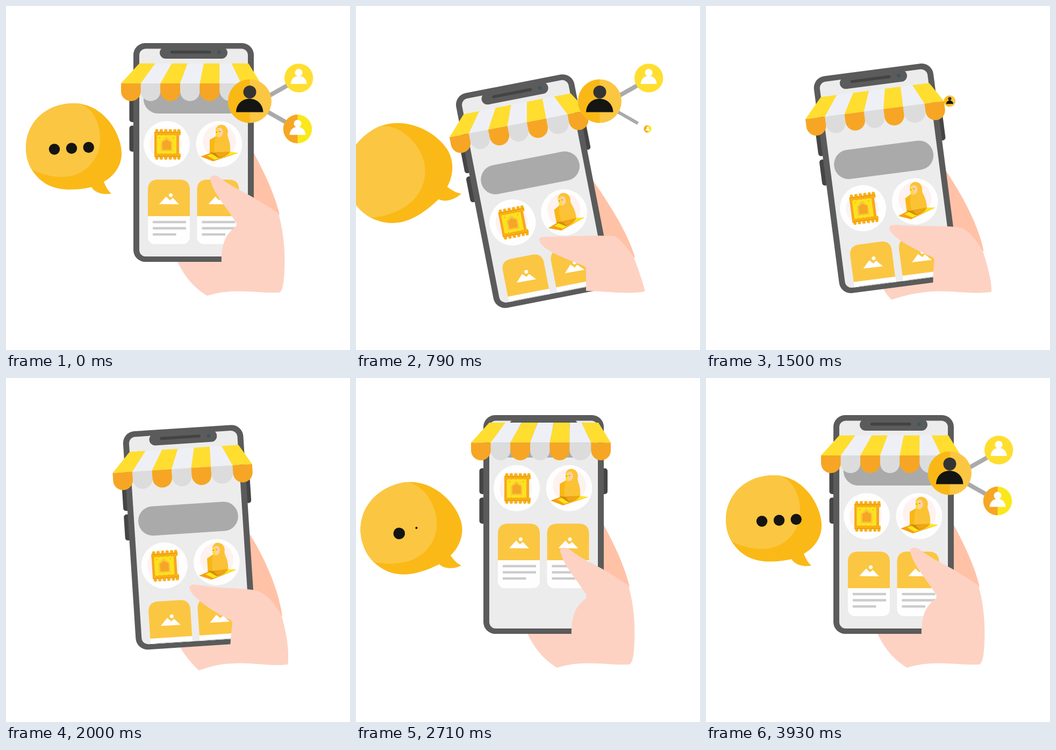
These frames come from a looping animation (640 by 640 pixels, 4780 ms). An HTML page:

```html
<!DOCTYPE html>
<html lang="en">
<head>
<meta charset="utf-8">
<title>Mobile shop</title>
<style>
  html, body { margin: 0; width: 100%; height: 100%; overflow: hidden; background: #fff; }
  svg { display: block; width: 100vw; height: 100vh; }
</style>
</head>
<body>
<svg viewBox="0 0 640 640">
  <defs>
    <clipPath id="screen"><rect x="248" y="79.5" width="202" height="386.5" rx="12"/></clipPath>
    <g id="card">
      <rect x="264" y="350" width="78" height="93" rx="13" fill="#fefefe"/>
      <path d="M264 391V342Q264 323 283 323H323Q342 323 342 342V391Z" fill="#fbc642"/>
      <path d="M285 368.500L298 354.500 305 361.500 310.500 357 322 369Z" fill="#fff"/>
      <circle cx="306.500" cy="352" r="3.500" fill="#fff"/>
      <path d="M273 402H335M273 413.500H335M273 425H316.500" stroke="#ccc" stroke-width="4.400"/>
    </g>
    <g id="person"><circle cy="-10" r="7"/><path d="M-15 11C-14 -9 14 -9 15 11Z"/></g>
    <g id="fringe" fill="#f8a81d">
      <rect x="276" y="234" width="49" height="6"/>
      <path d="M280.500 232V238M288.900 232V238M297.300 232V238M305.700 232V238M314.100 232V238M321.500 232V238"
            stroke="#f9b115" stroke-width="6" stroke-linecap="round"/>
      <path d="M277 235H324" stroke="#e5900f" stroke-width="1"/>
    </g>
  </defs>

  <path id="fingers" fill="#ffc2a7"/>
  <path id="wrist" fill="#fdd2c3"/>

  <g id="phone">
    <g fill="#454545">
      <rect x="229.500" y="168" width="16" height="48" rx="5"/>
      <rect x="229.500" y="222.500" width="16" height="48.500" rx="5"/>
      <rect x="452" y="168" width="16" height="48" rx="5"/>
    </g>
    <rect x="237" y="69" width="224" height="407" rx="22" fill="#5a5b5a"/>
    <rect x="248" y="79.500" width="202" height="386.500" rx="12" fill="#ececec"/>
    <rect x="286" y="76" width="126" height="22" rx="11" fill="#5a5b5a"/>
    <rect x="306" y="83" width="75.500" height="5.500" rx="2.700" fill="#434343"/>
    <circle cx="396.500" cy="86" r="3" fill="#3b5466"/>
    <g clip-path="url(#screen)">
      <g id="content">
        <rect x="255.800" y="145.500" width="186" height="54.500" rx="27" fill="#aaa"/>
        <g fill="#fefefe"><circle cx="299" cy="257" r="43"/><circle cx="396.500" cy="257" r="43"/></g>
        <g fill="#fef2f1"><circle cx="297" cy="257" r="30"/><circle cx="397" cy="252" r="31"/></g>
        <g>
          <rect x="276" y="236" width="46" height="44" fill="#f6a623"/>
          <rect x="280.500" y="239.500" width="36.500" height="36" fill="#fbe31c"/>
          <path d="M288 270V253L298.500 243 309.500 253V270Z" fill="#fbc540"/>
          <path d="M291 267.500V253Q295 252 298.500 248 302 252 307 253V267.500Z" fill="#f5a623"/>
          <path d="M285 245h2m23 0h2" stroke="#f5a623" stroke-width="2"/>
          <use href="#fringe"/><use href="#fringe" transform="matrix(1 0 0 -1 0 515)"/>
        </g>
        <g>
          <path d="M362 280L392 269 432 273.500 385 289Z" fill="#f6a014"/>
          <path d="M374 278L402 269 432 273.500 388 286Z" fill="#ffe515"/>
          <path d="M378 272Q393 268 416 271 414 279 395 283Z" fill="#d08c0c"/>
          <path d="M390 274L417 270Q414 279 396 281Z" fill="#f1a415"/>
          <path d="M379 272V249L391 242 389 273Z" fill="#f8b716"/>
          <path d="M390 229Q394 220 402 221 412 223 413 234 411 240 414 247 418 258 417 271L388 273Q386 255 391 242Z" fill="#fbc235"/>
          <path d="M391 229Q403 222 404 235 403 244 395 244 390 241 390 233Z" fill="#ffd0a8"/>
          <path d="M391 229Q399 228 396 235L395 244 390 242Z" fill="#ffdf30"/>
          <path d="M390.500 234.500h2m4-1h2" stroke="#6b4a2b"/>
        </g>
        <use href="#card"/><use href="#card" x="91.500"/>
      </g>
    </g>
    <g id="awning"></g>
  </g>

  <path id="thumb" fill="#fdd2c3"/>

  <g id="bubble">
    <path fill="#fab916" d="M37 262C38 215 76 181 126 181 180 181 215 235 215 275 215 298 200 317 182 327 186 337 190 344 196 349 180 352 165 347 159 337 105 348 70 340 47 303 41 292 37 280 37 262Z"/>
    <path fill="#fbc642" d="M37 262C38 215 76 181 126 181Q132 181 138 181.500C160 190 175 215 175 248 175 290 142 318 105 318 84 318 62 312 47 303 41 292 37 280 37 262Z"/>
    <g id="dots" fill="#141412"><circle cx="104" cy="266.500"/><circle cx="136" cy="264.700"/><circle cx="167.700" cy="263"/></g>
  </g>

  <g stroke="#aaa" stroke-width="8">
    <path id="lowLine" d="M480 193L530 221.500"/>
    <path id="topLine" d="M480 172.500L530 144"/>
  </g>
  <g id="lowNode">
    <circle cx="542.500" cy="228.800" r="26.700" fill="#fae81c"/>
    <path d="M542.500 202.100a26.700 26.700 0 0 0 0 53.400Z" fill="#f6a624"/>
    <use href="#person" x="542.500" y="228.800" fill="#fff"/>
  </g>
  <g id="topNode">
    <circle cx="544.700" cy="134" r="26.700" fill="#ffde30"/>
    <use href="#person" x="544.700" y="134" fill="#fff"/>
  </g>
  <g id="mainNode">
    <circle cx="453.500" cy="177" r="40.500" fill="#fbc642"/>
    <path d="M453.500 136.500a40.500 40.500 0 0 0 0 81Z" fill="#fab817"/>
    <circle cx="453.500" cy="160" r="12" fill="#333"/>
    <path d="M428 197.500C429 164 477 164 478.500 197.500Z" fill="#141412"/>
  </g>
</svg>

<script>
const FPS = 14, LOOP = 4780, LAST = 55;
const $ = id => document.getElementById(id);
const set = (id, value) => $(id).setAttribute('transform', value);

// Awning stripes
const rail = [248, 278, 308.5, 338, 368, 397.5, 419.5, 451];
const hem = [214, 250.8, 287.3, 324, 360.5, 397.3, 437.5, 474];
$('awning').innerHTML = rail.slice(0, 7).map((x, i) => {
  const l = hem[i], r = hem[i + 1], rad = (r - l) / 2;
  return `<path fill="${i % 2 ? '#eff0f6' : '#ffde30'}" d="M${x} 106.800H${rail[i + 1]}L${r} 144H${l}Z"/>
    <path fill="${i % 2 ? '#dcdcdc' : '#f6a624'}" d="M${l} 144H${r}V${177 - rad}A${rad} ${rad} 0 0 1 ${l} ${177 - rad}Z"/>`;
}).join('');

// Hand outlines: upright, slightly tilted, fully tilted
const hand = {
  fingers: [
    'M455 262C475 300 497 340 509 388L430 400Z',
    'M448 282C470 315 505 380 514 443L430 440Z',
    'M436 318C470 365 507 425 519 468L425 470Z'],
  wrist: [
    'M300 430C318 480 335 515 374 539Q410 528 450 531L450 430Z',
    'M300 455C318 490 330 518 359 544Q395 530 430 531L430 455Z',
    'M312 480C318 510 322 535 331 549Q375 535 428 530L428 480Z'],
  thumb: [
    'M381 326C376 316 388 311 400 321C418 335 440 345 458 355Q485 371 507 386C519 430 519 470 518 490Q517 531 508 533C478 535 450 528 404 532C398 460 398 432 428 410Q430 406 427 401C410 374 386 348 381 326Z',
    'M341 391C340 383 352 383 364 386C395 391 425 390 458 394Q487 396 513 443C521 472 525 495 525 515Q525 532 524 533C490 537 455 528 416 531C417 510 417 485 421 458Q422 454 418 450C395 440 345 410 341 391Z',
    'M341 436C339 429 350 429 366 429C395 429 440 426 478 428Q490 428 517 468C526 492 533 512 536 524Q538 530 537 531C510 537 470 531 428 530C428 515 428 500 428 490Q429 487 425 484C400 473 345 456 341 436Z']
};

const mix = (a, b, u) => a + (b - a) * u;
const ramp = (k, from, to) => Math.min(1, Math.max(0, (k - from) / (to - from)));

// Eased value through [step, value] keys
function track(k, ...keys) {
  let value = keys[0][1];
  for (let i = 1; i < keys.length; i++) {
    const u = ramp(k, keys[i - 1][0], keys[i][0]);
    value = mix(value, keys[i][1], u * u * (3 - 2 * u));
  }
  return value;
}

function morph([rest, low, high], swipe, tilt) {
  const lows = low.match(/\d+/g), highs = high.match(/\d+/g);
  let i = 0;
  return rest.replace(/\d+/g, n => {
    const posed = mix(+lows[i], +highs[i++], (tilt - 3.7) / 7.3);
    return mix(+n, posed, swipe).toFixed(2);
  });
}

const around = (x, y, scale, angle = 0) =>
  `translate(${x} ${y}) rotate(${angle}) scale(${scale}) translate(${-x} ${-y})`;

// id, centre, step it shrinks away, step it grows back
const shares = [
  ['lowNode', 542.5, 228.8, 7.9, 49.85], ['lowLine', 507, 208, 10, 50.8],
  ['topNode', 544.7, 134, 12.9, 44.85], ['topLine', 507, 157, 15, 46],
  ['mainNode', 453.5, 177, 17.9, 39.85]
];

function draw(k) {
  const tilt = k < 14 ? track(k, [0, 0], [10.5, 11]) : 11 * (1 - ramp(k, 14.2, 35));
  const swipe = track(k, [0, 0], [10.5, 1], [28, 1], [35, 0]);
  set('phone', `rotate(${-tilt} 714 402)`);
  set('content', `translate(0 ${track(k, [0, 0], [10.5, 65], [28, 65], [38, -52], [49.5, 0])})`);
  set('awning', `translate(0 ${track(k, [31, 0], [39.5, -26], [49.5, 0])})`);
  for (const id in hand) $(id).setAttribute('d', morph(hand[id], swipe, tilt));

  const turn = 32 * (ramp(k, 0, 11) - ramp(k, 32, 43));
  const pop = 1 - ramp(k, 11.5, 15.5) + ramp(k, 28.5, 32.4);
  set('bubble', around(196, 349, pop * (1 + turn * 0.0037), -turn));

  const leaving = k < 20;
  set('dots', `translate(${leaving ? -14 * (k + 1) : 0} 0)`);
  $('dots').setAttribute('opacity', leaving ? 1 - ramp(k, 0, 5) : 1);
  [...$('dots').children].forEach((dot, i) => {
    const start = 31.5 + 5.85 * i;
    dot.setAttribute('r', leaving ? 10.2 : 10.2 * ramp(k, start, start + 3.5));
  });

  for (const [id, x, y, out, back] of shares)
    set(id, around(x, y, 1 - ramp(k, out, out + 4.2) + ramp(k, back, back + 4.2)));
}

function tick() {
  const t = performance.now() % LOOP;
  draw(Math.min(LAST, Math.floor(t * FPS / 1000 + 0.1)));
  requestAnimationFrame(tick);
}
tick();
</script>
</body>
</html>
```
